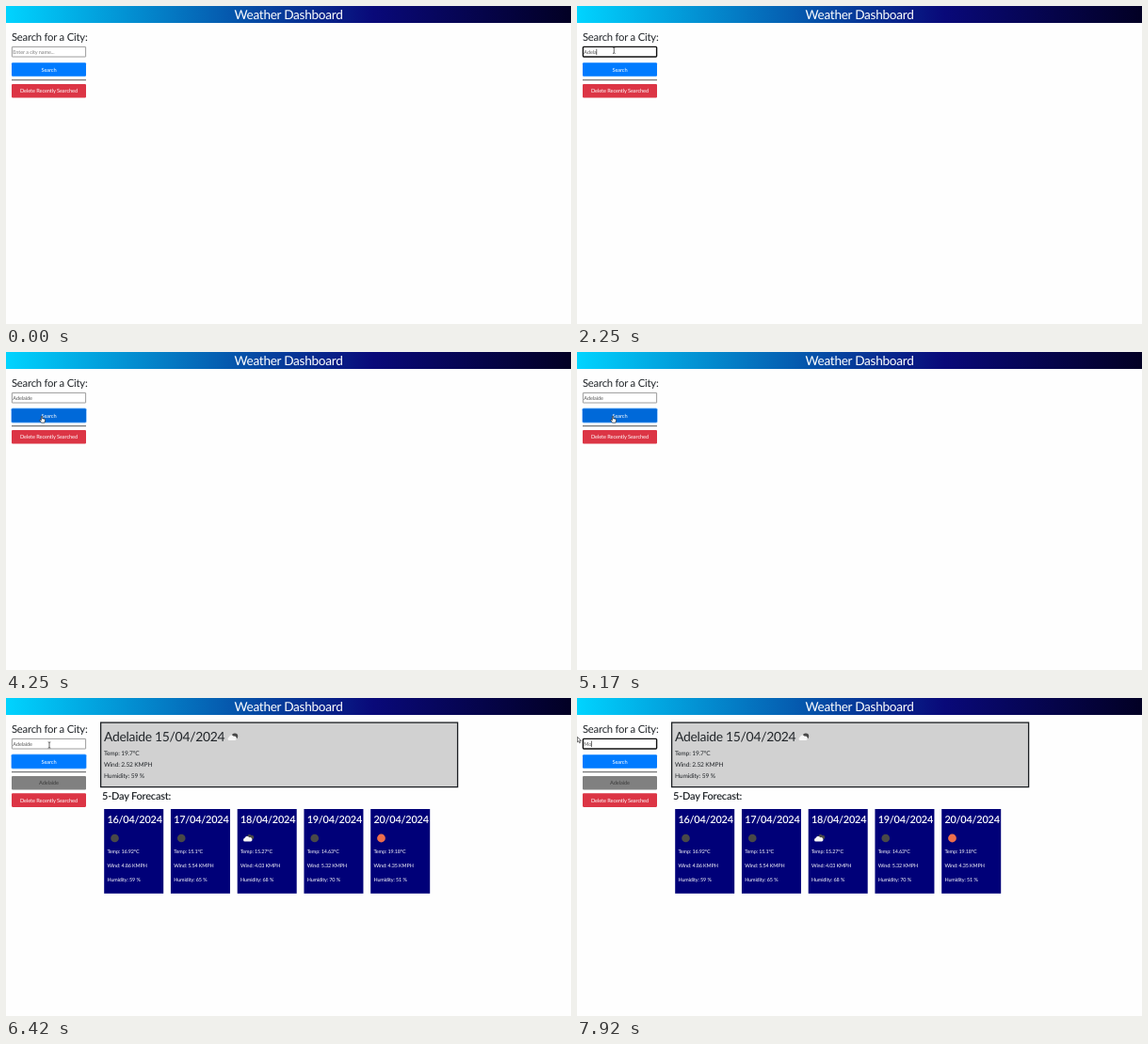
These frames come from a looping animation (600 by 338 pixels, 8000 ms). An HTML page:

```html
<!DOCTYPE html>
<html lang="en">
<head>
<meta charset="utf-8">
<title>Weather Dashboard</title>
<style>
  html, body { margin: 0; width: 100%; height: 100%; overflow: hidden; background: #fefefe; }
  svg { display: block; width: 100vw; height: 100vh; }
  text {
    font-family: Lato, "Open Sans", sans-serif;
    letter-spacing: -.02em;
    text-rendering: geometricPrecision;
    white-space: pre;
  }
</style>
</head>
<body>
<svg id="stage" viewBox="0 0 600 338">
  <defs>
    <linearGradient id="bar">
      <stop offset="0" stop-color="#00d4ff"/>
      <stop offset=".65" stop-color="#090979"/>
      <stop offset="1" stop-color="#020024"/>
    </linearGradient>
  </defs>
</svg>
<script>
const LOOP = 8000, STEP = 1000 / 12, BLINK = 500;
const stage = document.getElementById('stage');

function add(parent, tag, attrs, content) {
  const el = document.createElementNS('http://www.w3.org/2000/svg', tag);
  for (const key in attrs) el.setAttribute(key, attrs[key]);
  if (content) el.textContent = content;
  return parent.appendChild(el);
}
const group = (parent, attrs = {}) => add(parent, 'g', attrs);
const rect = (parent, x, y, width, height, fill, more) =>
  add(parent, 'rect', { x, y, width, height, fill, ...more });
const label = (parent, x, y, size, fill, content, more) =>
  add(parent, 'text', { x, y, 'font-size': size, fill, ...more }, content);
const disc = (parent, cx, cy, r, fill) => add(parent, 'circle', { cx, cy, r, fill });
const show = (el, on) => el.setAttribute('display', on ? 'inline' : 'none');
const middle = { 'text-anchor': 'middle' };
const semibold = { 'font-weight': 600 };

function button(y, fill, color, content) {
  const g = group(stage);
  const face = rect(g, 6, y, 79, 14.6, fill, { rx: 1.1 });
  label(g, 45.5, y + 9.3, 5.7, color, content, middle);
  return { g, face };
}

function cloud(parent, x, y, fill, scale = 1) {
  add(parent, 'path', {
    transform: `translate(${x} ${y}) scale(${scale})`, fill,
    d: 'M-3.4 3A2 2 0 0 1-3.6-.9A3 3 0 0 1 1.9-1.9A2.5 2.5 0 0 1 3.6 3Z'
  });
}

const icons = {
  night(g, x, y) { disc(g, x, y, 4.3, '#484848'); },
  sun(g, x, y) { disc(g, x, y, 4.4, '#ec6e4c'); },
  clouds(g, x, y) {
    cloud(g, x + 2, y - 1.4, '#484848', .8);
    cloud(g, x - .4, y + .9, '#f4f4f4', .9);
  },
  partly(g, x, y) {
    disc(g, x + 2, y - .7, 3.2, '#484848');
    cloud(g, x - .9, y + 1.1, '#f6f6f6', .9);
  }
};

// Header and sidebar
rect(stage, 0, 0, 600, 18, 'url(#bar)');
label(stage, 300, 13.8, 13.6, '#fff', 'Weather Dashboard', middle);
label(stage, 6, 37, 11.3, '#212529', 'Search for a City:');

const field = rect(stage, 6.4, 43.4, 78.2, 10.6, '#fff');
const mark = rect(stage, 7.3, 45.2, 0, 7.2, '#0078d7');
const value = label(stage, 7.3, 50.6, 5.6, '#757575', '');
const caret = rect(stage, 7, 45.5, .6, 6.6, '#111');

const ring = rect(stage, 5.3, 59.5, 80.4, 16, '#80bdff', { rx: 1.8 });
const search = button(60.2, '#007bff', '#fff', 'Search');
rect(stage, 6, 78.2, 79, 1, '#555');
const recent = button(83, '#808080', '#3c3c3c', 'Adelaide');
const remove = button(83, '#dc3545', '#fff', 'Delete Recently Searched');

// Weather results
const results = group(stage);
rect(results, 100.6, 26.1, 379, 68.5, '#d1d1d1', { stroke: '#1b1e22', 'stroke-width': 1.3 });
label(results, 104, 45.6, 13.9, '#212529', 'Adelaide 15/04/2024');
icons.partly(results, 241, 41.3);
['Temp: 19.7°C', 'Wind: 2.52 KMPH', 'Humidity: 59 %'].forEach((line, i) =>
  label(results, 104, 60.8 + i * 12.1, 6.6, '#212529', line));
label(results, 102, 108.2, 11, '#212529', '5-Day Forecast:', semibold);

[
  ['night', '16.92', '4.86', 59],
  ['night', '15.1', '5.54', 65],
  ['clouds', '15.27', '4.03', 68],
  ['night', '14.63', '5.32', 70],
  ['sun', '19.18', '4.35', 51]
].forEach(([icon, temp, wind, humidity], i) => {
  const card = group(results, { transform: `translate(${104.2 + i * 70.75} 118)` });
  rect(card, 0, 0, 63, 89.8, '#000078');
  label(card, 3.2, 15.2, 10.9, '#fff', `${16 + i}/04/2024`, semibold);
  icons[icon](card, 11.3, 31);
  [`Temp: ${temp}°C`, `Wind: ${wind} KMPH`, `Humidity: ${humidity} %`].forEach((line, row) =>
    label(card, 3.2, 46.6 + row * 15.2, 5.45, '#fff', line));
});

// Pointers
const outline = { fill: '#fff', stroke: '#111', 'stroke-width': .6, 'stroke-linejoin': 'round' };
const pointers = { arrow: group(stage), hand: group(stage), beam: group(stage) };
add(pointers.arrow, 'path', { ...outline, d: 'M.2 .2V5.7L1.5 4.6L2.4 6.6L3.3 6.2L2.5 4.2H4.1Z' });
add(pointers.hand, 'path', {
  ...outline,
  d: 'M-.6 .2Q0-.4.6.2V2.5L3 3Q3.7 3.2 3.6 4L3.1 6.9H-.5L-2.3 4.4Q-2.2 3.4-1.3 3.9L-.6 4.5Z'
});
add(pointers.beam, 'path', {
  fill: 'none', stroke: '#222', 'stroke-width': .7,
  d: 'M-1.3-3.2Q0-3.2 0-2.5Q0-3.2 1.3-3.2M0-2.5V2.5M-1.3 3.2Q0 3.2 0 2.5Q0 3.2 1.3 3.2'
});

const path = [
  [83, 57, 80], [250, 48, 62], [417, 44, 56], [667, 40, 48], [1167, 39.3, 47.2],
  [3083, 39.3, 47.2], [3417, 36.2, 48.5], [3583, 36.3, 51], [3917, 37.2, 67],
  [4250, 38, 68.2], [6000, 38, 68.2], [6417, 46, 50], [6583, 46, 49], [6833, .2, 41.2]
];
const keys = [1417, 1667, 1833, 2000, 2250, 2417, 2667, 2833];
const newKeys = [7583, 7833];
const FOCUS = 667, CLICK = 4167, LOADED = 5333, DRAG = 6583, RELEASE = 6833;

function pointerAt(t) {
  const next = path.findIndex(p => p[0] > t);
  if (next < 0) return path[path.length - 1].slice(1);
  const [t0, x0, y0] = path[Math.max(next - 1, 0)], [t1, x1, y1] = path[next];
  const k = t1 > t0 ? (t - t0) / (t1 - t0) : 0;
  return [x0 + (x1 - x0) * k, y0 + (y1 - y0) * k];
}

const pressed = (times, t) => times.filter(k => k <= t).length;

function drawField(t) {
  const focused = (t >= FOCUS && t < CLICK) || t >= DRAG;
  field.setAttribute('stroke', focused ? '#101010' : '#858585');
  field.setAttribute('stroke-width', focused ? 1.4 : .8);
  field.setAttribute('rx', focused ? .9 : .3);

  const retyped = pressed(newKeys, t);
  const typed = retyped ? 'Mo'.slice(0, retyped) : 'Adelaide'.slice(0, pressed(keys, t));
  const selected = t >= DRAG + 2 * STEP && !retyped;
  value.textContent = typed || 'Enter a city name...';
  value.setAttribute('fill', selected ? '#fff' : typed ? '#5c5c5c' : '#808080');

  const width = value.getComputedTextLength();
  mark.setAttribute('width', selected ? width : 0);
  const last = Math.max(...[FOCUS, DRAG, ...keys, ...newKeys].filter(k => k <= t));
  show(caret, focused && !selected && (t - last) % (2 * BLINK) < BLINK);
  caret.setAttribute('x', 7.2 + (typed ? width : 0));
}

function drawPointer(t) {
  const [x, y] = pointerAt(t);
  const inside = (top, bottom) => t >= 83 && x >= 6 && x <= 85 && y >= top && y <= bottom;
  const dragging = t >= DRAG && t < RELEASE;
  const onSearch = inside(60.2, 74.8);
  const kind = dragging || inside(43, 54.4) ? 'beam' : onSearch ? 'hand' : 'arrow';
  for (const name in pointers) {
    show(pointers[name], t >= 83 && name === kind);
    pointers[name].setAttribute('transform', `translate(${x} ${y})`);
  }
  search.face.setAttribute('fill', onSearch ? '#0069d9' : '#007bff');
}

function draw(time) {
  const t = Math.floor((time % LOOP + 4) / STEP) * STEP + 1;
  const loaded = t >= LOADED;
  drawField(t);
  drawPointer(t);
  show(ring, t >= CLICK && t < DRAG);
  show(results, loaded);
  show(recent.g, loaded);
  remove.g.setAttribute('transform', `translate(0 ${loaded ? 18.3 : 0})`);
}

const start = performance.now();
function tick() {
  draw(performance.now() - start);
  requestAnimationFrame(tick);
}
tick();
</script>
</body>
</html>
```
